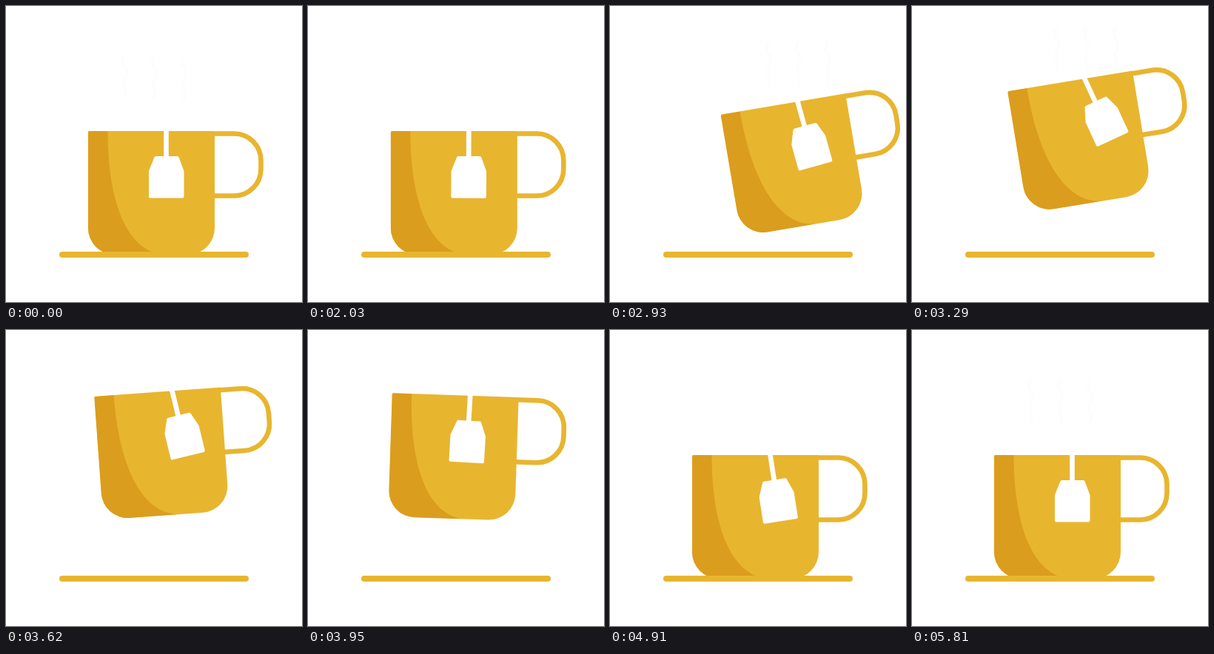
Write an HTML page with a canvas that moves like this. It is 400 px wide and 400 px high and loops after 5840 ms.

```html
<!DOCTYPE html>
<html lang="en">
<head>
<meta charset="utf-8">
<title>Tea cup</title>
<style>
  html, body { margin: 0; width: 100%; height: 100%; overflow: hidden; background: #fff; }
  canvas { display: block; width: 400px; height: 400px; }
</style>
</head>
<body>
<canvas id="stage" width="400" height="400"></canvas>
<script>
const ctx = document.getElementById('stage').getContext('2d');
const LOOP = 5840, REST = 2030, STEP = 30, STEAM_LAG = 90;
const GOLD = '#e8b52f', SHADE = '#db9d1e', STEAM = '#fdfdfd';
const PIVOT = { x: 196.5, y: 251 };
const KNOT = { x: 216.5, y: 169 };

// A smooth curve through a few [time, value] points, level at its ends and peaks
function curve(...points) {
  const slope = i => {
    const [a, p, b] = [points[i - 1], points[i], points[i + 1]];
    if (!a || !b || (p[1] - a[1]) * (b[1] - p[1]) <= 0) return 0;
    return (b[1] - a[1]) / (b[0] - a[0]);
  };
  return t => {
    const j = points.findIndex(p => p[0] > t);
    if (j < 1) return 0;
    const [t0, a] = points[j - 1], [t1, b] = points[j], h = t1 - t0;
    const u = (t - t0) / h, v = 1 - u;
    return v * v * (1 + 2 * u) * a + u * u * (1 + 2 * v) * b
      + h * u * v * (v * slope(j - 1) - u * slope(j));
  };
}

const cupX = curve([1970, 0], [2570, 42], [2790, 54.3], [3290, 30.3], [3950, 0], [4370, -4.6], [4750, 0]);
const cupY = curve([1970, 0], [2570, -9], [3290, -68.6], [3780, -88], [3950, -81], [4370, -40.5], [4640, 0]);
const cupAngle = curve([1970, 0], [2570, -1.8], [3050, -10.8], [3950, 1.9], [4270, 9.2], [4790, 0]);
const bagSwing = curve([1970, 0], [2520, 9], [3240, -15.6], [3950, 1.5], [4370, 25.2], [4930, -9], [5420, 3], [5810, 0]);

function rotateAbout(p, degrees) {
  ctx.translate(p.x, p.y);
  ctx.rotate(degrees * Math.PI / 180);
  ctx.translate(-p.x, -p.y);
}

function stroke(path, color, width, cap = 'butt') {
  ctx.strokeStyle = color;
  ctx.lineWidth = width;
  ctx.lineCap = cap;
  ctx.stroke(path);
}

function fill(path, color) {
  ctx.fillStyle = color;
  ctx.fill(path);
}

const body = new Path2D('M113 169H282V300A36 36 0 0 1 246 336H147A36 36 0 0 1 111 300V171Q111 169 113 169Z');
const shade = new Path2D('M111 169H137.5C137.5 262 162 330 212 336H111Z');
const handle = new Path2D('M280 172.5H308.5A36 36 0 0 1 344.5 208.5V220.5A36 36 0 0 1 308.5 256.5H280');
const bag = new Path2D('M202.5 203H231.5Q233 203 233.6 204.5L240.5 223V257.5Q240.5 259.5 238.5 259.5H195Q193 259.5 193 257.5V223L200.4 204.5Q201 203 202.5 203Z');
const thread = new Path2D('M216.5 162V205');
const saucer = new Path2D('M76 336H324');
const wisp = new Path2D('M0 67C-8 82 8 82 2 96C-6 110 6 112 0 126');

function drawSteam(t) {
  const visible = t < REST || (t > 2400 && t < 3500) || t > 5600;
  if (!visible) return;
  for (const x of [160, 200, 240]) {
    ctx.save();
    ctx.translate(x + cupX(t - STEAM_LAG), cupY(t - STEAM_LAG) * 0.6);
    stroke(wisp, STEAM, 4, 'round');
    ctx.restore();
  }
}

function drawCup(t) {
  ctx.save();
  ctx.translate(cupX(t), cupY(t));
  rotateAbout(PIVOT, cupAngle(t));
  stroke(handle, GOLD, 6.6);
  fill(body, GOLD);
  ctx.save();
  ctx.clip(body);
  fill(shade, SHADE);
  ctx.restore();
  rotateAbout(KNOT, bagSwing(t));
  stroke(thread, '#fff', 6.6);
  fill(bag, '#fff');
  ctx.restore();
}

function draw(time) {
  const t = time < REST ? 0 : time - (time - REST) % STEP;
  ctx.fillStyle = '#fff';
  ctx.fillRect(0, 0, 400, 400);
  drawSteam(t);
  drawCup(t);
  stroke(saucer, GOLD, 8, 'round');
}

const start = performance.now();
function tick() {
  draw((performance.now() - start) % LOOP);
  requestAnimationFrame(tick);
}
tick();
</script>
</body>
</html>
```
